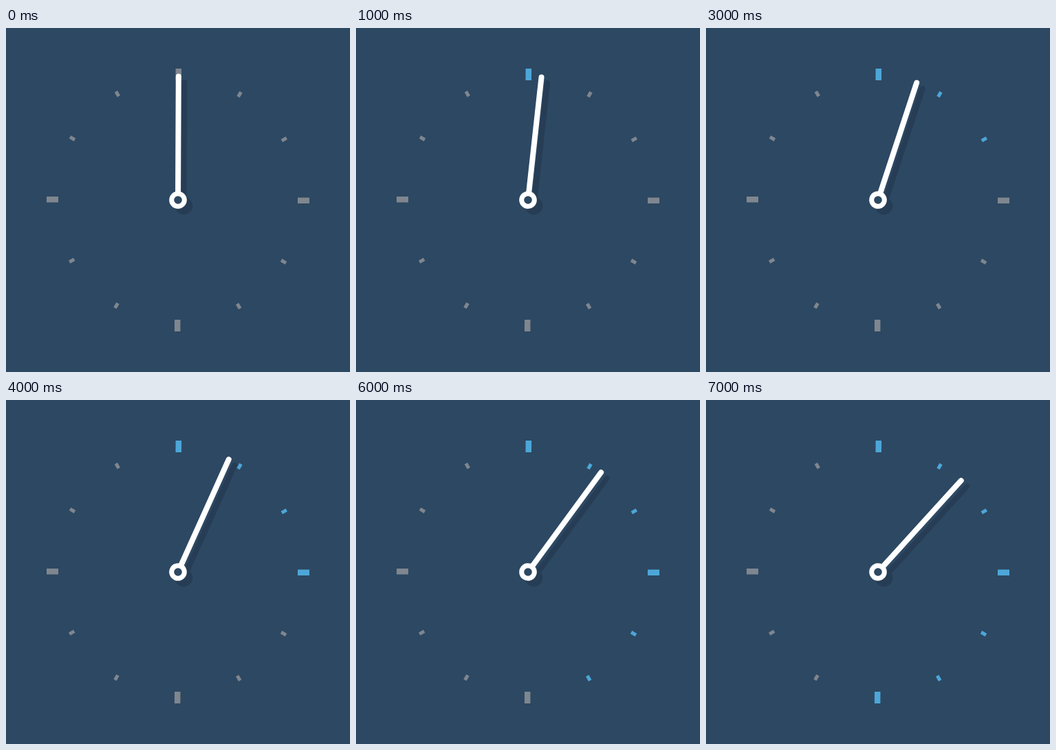
An HTML page with a canvas for the animation above (8000 ms loop, 500 by 500 pixels).

```html
<!DOCTYPE html>
<html lang="en">
<head>
<meta charset="utf-8">
<title>Clock</title>
<style>
  html, body { margin: 0; width: 100%; height: 100%; overflow: hidden; background: #2d4862; }
  canvas { display: block; width: 100vmin; height: 100vmin; }
</style>
</head>
<body>
<canvas id="stage" width="500" height="500"></canvas>
<script>
const ctx = document.getElementById('stage').getContext('2d');
const CENTER = 250, STEP_MS = 1000, STEPS = 8;
const TILT = 0.25; // whole dial is turned slightly, in degrees
const COLORS = { back: '#2d4862', off: '#7f868f', on: '#4da6d8', shadow: '#263d55', hand: '#ffffff' };
const radians = degrees => degrees * Math.PI / 180;

function drawTick(hour, lit) {
  const major = hour % 3 === 0;
  const [width, length, radius] = major ? [8.5, 17, 182.5] : [5, 8, 177.7];
  ctx.save();
  ctx.translate(CENTER, CENTER);
  ctx.rotate(radians(hour * 30 + TILT));
  ctx.fillStyle = lit ? COLORS.on : COLORS.off;
  ctx.fillRect(-width / 2, -radius - length / 2, width, length);
  ctx.restore();
}

function drawDisc(radius, color) {
  ctx.fillStyle = color;
  ctx.beginPath();
  ctx.arc(0, 0, radius, 0, Math.PI * 2);
  ctx.fill();
}

function drawHand(angle, color, offset) {
  ctx.save();
  ctx.translate(CENTER + offset, CENTER + offset);
  ctx.rotate(angle);
  ctx.strokeStyle = color;
  ctx.lineWidth = 8;
  ctx.lineCap = 'round';
  ctx.beginPath();
  ctx.moveTo(0, 0);
  ctx.lineTo(0, -179.5);
  ctx.stroke();
  drawDisc(12.8, color);
  ctx.restore();
}

function drawHub() {
  ctx.save();
  ctx.translate(CENTER, CENTER);
  drawDisc(5.8, COLORS.back);
  ctx.restore();
}

function render(time) {
  const second = Math.floor(time / STEP_MS) % STEPS;
  const angle = radians(second * 6 + TILT);
  ctx.fillStyle = COLORS.back;
  ctx.fillRect(0, 0, 500, 500);
  for (let hour = 0; hour < 12; hour++) drawTick(hour, hour < second);
  drawHand(angle, COLORS.shadow, 8.5);
  drawHand(angle, COLORS.hand, 0);
  drawHub();
}

let start;
function frame(now) {
  start ??= now;
  render(Math.max(0, now - start));
  requestAnimationFrame(frame);
}
render(0);
requestAnimationFrame(frame);
</script>
</body>
</html>
```
